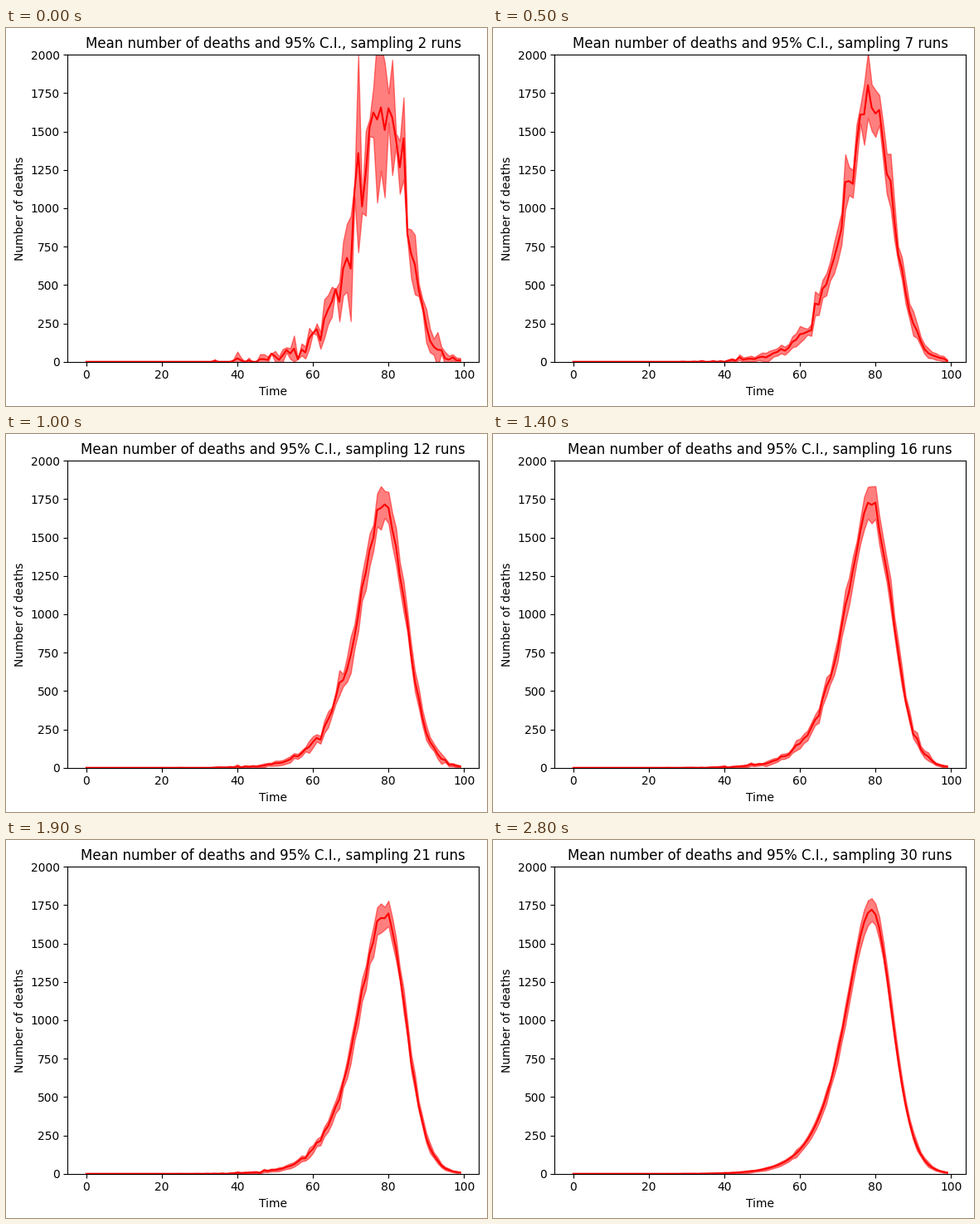
Write a matplotlib script that moves like this. It is 580 px wide and 455 px high and loops after 2900 ms.

```python
import numpy as np
import matplotlib.pyplot as plt
from matplotlib.animation import FuncAnimation

W, H, DPI = 580, 455, 100
POOL = 30                 # simulated runs to sample from
UNIT = 20                 # deaths per counted case
PEAK_T, PEAK = 79, 1720
t = np.arange(100)


def slope(d, rate, bend):
    """Hyperbola: flat near d = 0, then a straight line of the given rate."""
    return rate * (np.hypot(d, bend) - bend)


def epidemic():
    """Mean curve: slow exponential rise, rounded top, steeper fall."""
    d = t - PEAK_T
    drop = np.where(d < 0, slope(d, 0.185, 7.5), slope(d, 0.54, 15))
    return PEAK * np.exp(-drop)


def simulate(seed):
    """Random case counts per run, scaled so the pool mean is the curve."""
    rng = np.random.default_rng(seed)
    curve = epidemic()
    rate = curve / UNIT * rng.normal(1, 0.07, (POOL, len(t)))
    runs = UNIT * rng.poisson(rate)
    return runs * curve / np.maximum(runs.mean(axis=0), 1)


pool = simulate(4)


def sample(n):
    rng = np.random.default_rng(100 + n)
    return pool[rng.choice(POOL, n, replace=False)]


fig = plt.figure(figsize=(W / DPI, H / DPI), dpi=DPI, facecolor="white")
ax = fig.add_axes([74.278 / W, 53.278 / H, 496 / W, 369.6 / H])
ax.set_xlabel("Time")
ax.set_ylabel("Number of deaths")
band = ax.fill_between(t, 0 * t, 0 * t, color="r", alpha=0.5)
line, = ax.plot(t, 0 * t, color="r")
title = ax.set_title("")
ax.set_xlim(-4.95, 103.95)
ax.set_ylim(0, 2000)


def update(i):
    n = i + 2
    runs = sample(n)
    mean = runs.mean(axis=0)
    err = 1.96 * runs.std(axis=0, ddof=1) / np.sqrt(n)
    lower, upper = np.c_[t, mean - err], np.c_[t, mean + err]
    band.set_verts([np.r_[lower, upper[::-1]]])
    line.set_ydata(mean)
    title.set_text(f"Mean number of deaths and 95% C.I., sampling {n} runs")
    return band, line, title


anim = FuncAnimation(fig, update, frames=POOL - 1, interval=100,
                     init_func=lambda: (band, line, title),
                     repeat=True, repeat_delay=0)
plt.show()
```
